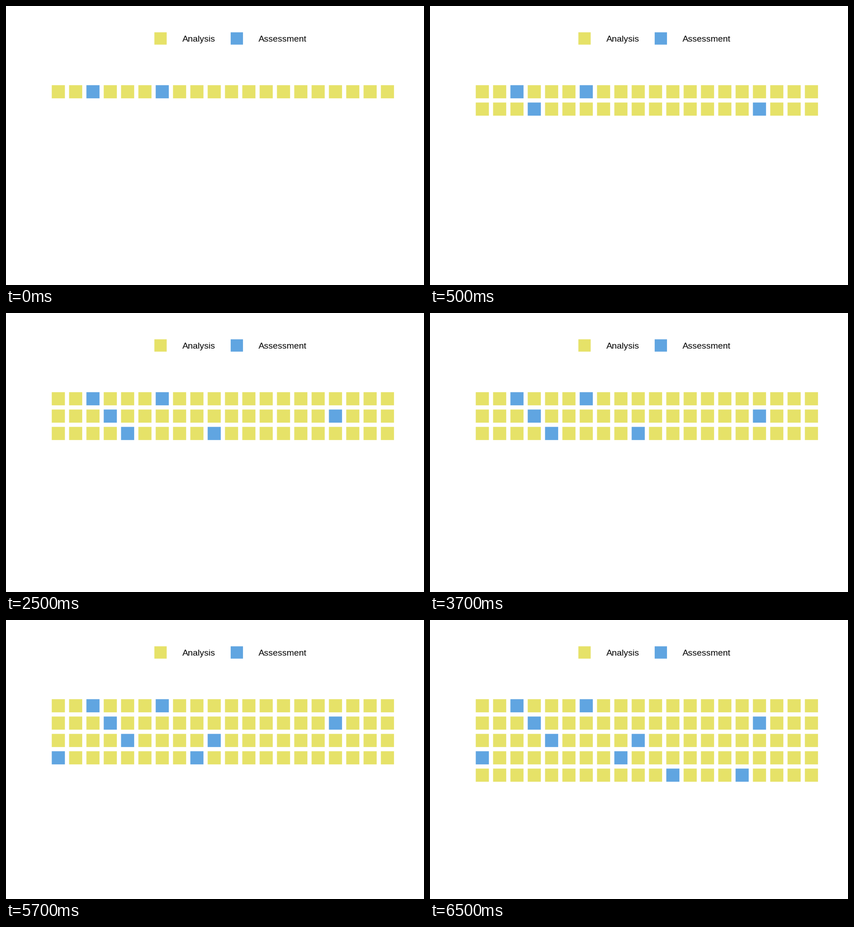
Animation, 917 px wide and 611 px high, one loop 8000 ms. Source, as a matplotlib script:

```python
import matplotlib.pyplot as plt
from matplotlib.animation import FuncAnimation
from matplotlib.patches import Rectangle

WIDTH, HEIGHT, DPI = 917, 611, 64
INTERVAL, FRAMES = 500, 16
YELLOW, BLUE = "#e6e268", "#60a5e1"
COLUMNS, PITCH, SIDE = 20, 38, 28.8
LEFT, TOP = 100.4, 173.4

# Columns of the assessment squares, one pair per row.
ASSESSMENTS = [(2, 6), (3, 16), (4, 9), (0, 8), (11, 15)]

fig = plt.figure(figsize=(WIDTH / DPI, HEIGHT / DPI), dpi=DPI, facecolor="white")
ax = fig.add_axes([0, 0, 1, 1])
ax.set(xlim=(0, WIDTH), ylim=(HEIGHT, 0))
ax.axis("off")


def square(x, y, side, color):
    return ax.add_patch(
        Rectangle((x, y), side, side, facecolor=color, linewidth=0, snap=False)
    )


def legend_entry(x, label, color):
    square(x, 57.6, 27, color)
    ax.text(x + 61.2, 78, label, color="black", family="Liberation Sans",
            fontsize=19.4 * 72 / DPI, va="baseline")


legend_entry(325.5, "Analysis", YELLOW)
legend_entry(492.9, "Assessment", BLUE)

rows = [
    [square(LEFT + col * PITCH, TOP + row * PITCH, SIDE,
            BLUE if col in blue_cols else YELLOW)
     for col in range(COLUMNS)]
    for row, blue_cols in enumerate(ASSESSMENTS)
]


def update(frame):
    # A new row appears every two seconds, the first change after 500 ms.
    visible = 1 + (frame * INTERVAL + 1500) // 2000
    for index, row in enumerate(rows):
        for patch in row:
            patch.set_visible(index < visible)
    return [patch for row in rows for patch in row]


anim = FuncAnimation(fig, update, frames=FRAMES, interval=INTERVAL,
                     repeat=True, repeat_delay=0)
plt.show()
```
